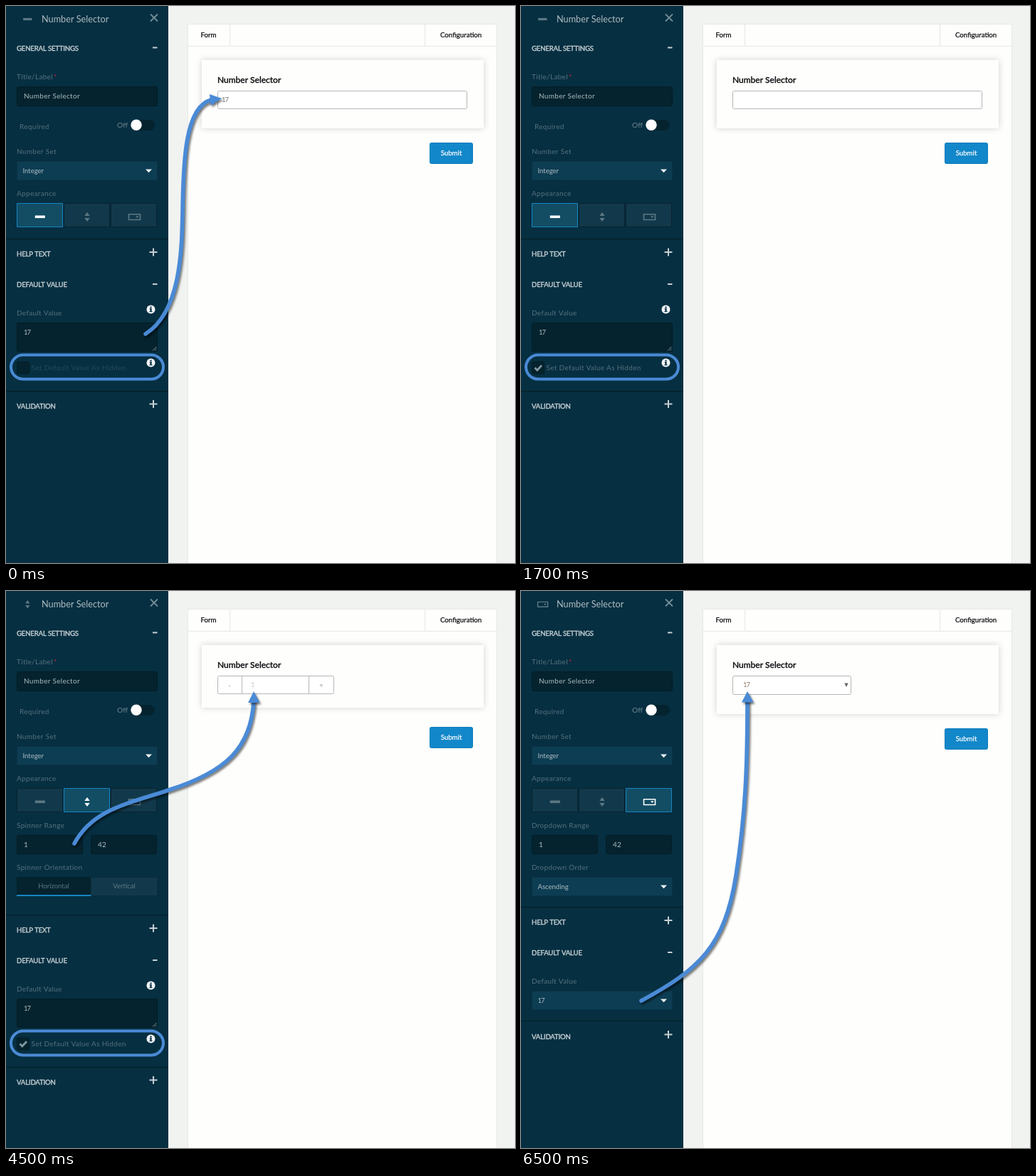
An HTML page with a canvas that plays this animation: 715x783 px, repeating every 8 s.

```html
<!DOCTYPE html>
<html lang="en">
<head>
<meta charset="utf-8">
<title>Number selector settings</title>
<style>
  html, body { margin: 0; width: 100%; height: 100%; overflow: hidden; background: #f1f3f1; }
  canvas { display: block; width: 715px; height: 783px; }
</style>
</head>
<body>
<canvas id="stage"></canvas>
<script>
const W = 715, H = 783, LOOP = 8000;
const canvas = document.getElementById('stage');
const ctx = canvas.getContext('2d');
const dpr = window.devicePixelRatio || 1;
canvas.width = W * dpr;
canvas.height = H * dpr;

const C = {
  side: '#062f41', dark: '#04232e', edge: '#031d27', select: '#0d3d53', button: '#12394b',
  active: '#124d64', accent: '#1785c4', label: '#55727f', dim: '#294b59', value: '#aebcc2',
  head: '#c5d0d4', icon: '#5c7884', page: '#f1f3f1', sheet: '#fefefc', line: '#e7e9e6',
  field: '#b6b6b6', ink: '#0c0e10', arrow: '#4a8ad6', submit: '#1287c9'
};

// size, letter spacing, outline that thickens the strokes
const T = {
  title: [12.7, 0, 0], label: [10, .32, 0], value: [10, .3, 0], digits: [9.6, -1.1, 0],
  head: [9.6, -.17, .4], tab: [9.7, 0, .25], field: [12, 0, .4], plain: [9.5, 0, 0], off: [10.3, 0, 0]
};

const scenes = [
  { end: 500, mode: 0, hidden: false, value: '17',
    arrow: [196, 461, 245, 430, 247, 345, 248, 290, 249, 215, 252, 142, 288, 132],
    tip: [303, 130, 286, 124, 287.5, 140] },
  { end: 2500, mode: 0, hidden: true, value: '' },
  { end: 4500, mode: 1, hidden: false, value: '17',
    arrow: [196, 588, 270, 544, 310, 490, 327, 400, 342, 320, 346, 240, 348, 155],
    tip: [348, 141, 340, 157, 356.5, 157] },
  { end: 6500, mode: 1, hidden: true, value: '1',
    arrow: [96, 355, 122, 306, 175, 298, 228, 280, 310, 254, 344, 220, 348, 155],
    tip: [348, 141, 340, 157, 356.5, 157] },
  { end: LOOP, mode: 2, hidden: false, value: '17',
    arrow: [169, 576, 250, 532, 286, 500, 302, 400, 316, 310, 318, 240, 318, 155],
    tip: [318, 141, 310, 156.5, 326.5, 156.5] }
];

// y is the middle of the capitals
function text(str, x, y, style, color, align = 'left') {
  const [size, gap, bold] = T[style];
  ctx.font = `400 ${size}px Lato, "Open Sans", sans-serif`;
  ctx.letterSpacing = gap + 'px';
  ctx.textAlign = align;
  ctx.fillStyle = ctx.strokeStyle = color;
  const base = Math.round(y + size * .36);
  ctx.fillText(str, x, base);
  if (bold) {
    ctx.lineWidth = bold;
    ctx.lineJoin = 'round';
    ctx.strokeText(str, x, base);
  }
}

function rect(x, y, w, h, color) {
  ctx.fillStyle = color;
  ctx.fillRect(x, y, w, h);
}

function box(x, y, w, h, r, fill, stroke) {
  ctx.beginPath();
  ctx.roundRect(x + .5, y + .5, w - 1, h - 1, r);
  ctx.fillStyle = fill;
  ctx.fill();
  ctx.lineWidth = 1;
  ctx.strokeStyle = stroke || fill;
  ctx.stroke();
}

function poly(points, color) {
  ctx.beginPath();
  for (let i = 0; i < points.length; i += 2) ctx.lineTo(points[i], points[i + 1]);
  ctx.closePath();
  ctx.fillStyle = color;
  ctx.fill();
}

function stroke(points, color, width) {
  ctx.beginPath();
  for (let i = 0; i < points.length; i += 4) {
    ctx.moveTo(points[i], points[i + 1]);
    ctx.lineTo(points[i + 2], points[i + 3]);
  }
  ctx.lineWidth = width;
  ctx.strokeStyle = color;
  ctx.stroke();
}

function modeIcon(mode, x, y, scale, color) {
  ctx.save();
  ctx.translate(x, y);
  ctx.scale(scale, scale);
  if (mode === 0) rect(-7, -2, 14, 3.6, color);
  if (mode === 1) {
    poly([0, -6.5, 3.7, -1.5, -3.7, -1.5], color);
    poly([0, 6.5, 3.7, 1.5, -3.7, 1.5], color);
  }
  if (mode === 2) {
    ctx.lineWidth = 1.6;
    ctx.strokeStyle = color;
    ctx.strokeRect(-7.7, -3.8, 16, 7.8);
    poly([1.8, -1.2, 6.4, -1.2, 4.1, 1.5], color);
  }
  ctx.restore();
}

function info(y) {
  ctx.beginPath();
  ctx.arc(203.5, y, 6, 0, Math.PI * 2);
  ctx.fillStyle = '#f4f7f8';
  ctx.fill();
  rect(202.4, y - 4, 2.2, 2, C.side);
  rect(201.6, y - 1.2, 3, 1, C.side);
  rect(202.4, y - 1.2, 2.2, 4, C.side);
  rect(201.4, y + 2.6, 4.2, 1.1, C.side);
}

function input(x, y, w, h, str, style) {
  box(x, y, w, h, 2, C.dark, C.edge);
  text(str, x + 10, y + 13.5, style, C.value);
}

function select(y, str, style = 'plain') {
  box(15, y, 198, 27, 1, C.select, '#0a3245');
  text(str, 23.5, y + 13.5, style, C.value);
  poly([196, y + 11.5, 205, y + 11.5, 200.5, y + 16.2], '#eef3f5');
}

function heading(str, y, open) {
  text(str, 15, y, 'head', C.head);
  if (open) rect(206, y - 2, 6.5, 2, C.head);
  else stroke([201.5, y - 3, 212.5, y - 3, 207, y - 8.5, 207, y + 2.5], C.head, 2);
}

function divider(y) {
  rect(0, y, 228, 1, C.edge);
}

function drawGeneral(s) {
  modeIcon(s.mode, 30.3, 18.7, .88, C.icon);
  text('Number Selector', 50, 18.5, 'title', C.value);
  stroke([203, 11.5, 213, 21.5, 213, 11.5, 203, 21.5], '#748d97', 1.8);
  heading('GENERAL SETTINGS', 59.5, true);

  text('Title/Label', 15, 99.5, 'label', C.label);
  text('*', 67, 99.5, 'label', '#d01f45');
  input(15, 113, 198, 28, 'Number Selector', 'value');

  text('Required', 19, 169.5, 'label', C.label);
  text('Off', 156, 167, 'off', '#6d858f');
  box(175, 160, 34, 15, 7, C.dark);
  ctx.beginPath();
  ctx.arc(183, 167.2, 7.7, 0, Math.PI * 2);
  ctx.fillStyle = '#fff';
  ctx.fill();

  text('Number Set', 15, 204.5, 'label', C.label);
  select(218, 'Integer');
  text('Appearance', 15, 263.5, 'label', C.label);
  for (let i = 0; i < 3; i++) {
    const on = i === s.mode, x = 15 + i * 66;
    box(x, 277, 65, 34, 0, on ? C.active : C.button, on ? C.accent : '#08222e');
    modeIcon(i, x + 32.8 + i * .2, 296.5, 1, on ? '#fff' : C.icon);
  }
}

function drawRange(mode) {
  const kind = mode === 1 ? 'Spinner' : 'Dropdown';
  text(kind + ' Range', 15, 329.5, 'label', C.label);
  input(15, 343, 93, 27, '1', 'value');
  input(119, 343, 93, 27, '42', 'value');
  text(kind + (mode === 1 ? ' Orientation' : ' Order'), 15, 388, 'label', C.label);
  if (mode === 2) return select(402, 'Ascending');
  box(15, 402, 198, 27, 1, C.button, '#0b2c3a');
  rect(15, 402, 104.5, 27, C.dark);
  rect(15, 427, 104.5, 2, C.accent);
  text('Horizontal', 67, 414.5, 'plain', C.icon, 'center');
  text('Vertical', 166, 415, 'plain', C.icon, 'center');
}

function drawHiddenOption(y, checked) {
  box(15, y - 9, 18, 18, 2, C.dark, C.edge);
  if (checked) {
    ctx.beginPath();
    ctx.moveTo(19.5, y);
    ctx.lineTo(22.8, y + 3.4);
    ctx.lineTo(29, y - 3.2);
    ctx.lineJoin = 'miter';
    ctx.lineWidth = 2.8;
    ctx.strokeStyle = '#82979f';
    ctx.stroke();
  }
  text('Set Default Value As Hidden', 35.5, y, 'label', checked ? C.label : C.dim);
  info(y - 7);
  ctx.beginPath();
  ctx.roundRect(7, y - 18, 214, 34, 17);
  ctx.lineWidth = 4;
  ctx.strokeStyle = C.arrow;
  ctx.stroke();
}

function drawSidebar(s) {
  rect(0, 0, 228, H, C.side);
  drawGeneral(s);
  if (s.mode) drawRange(s.mode);
  const dy = [0, 128, 117][s.mode];
  divider(327 + dy);
  heading('HELP TEXT', 349 + dy, false);
  heading('DEFAULT VALUE', 392 + dy, true);
  text('Default Value', 15, 431 + dy, 'label', C.label);
  if (s.mode === 2) {
    select(562, '17', 'digits');
    divider(604);
    heading('VALIDATION', 626.5, false);
    return;
  }
  const top = 445 + dy;
  info(426.5 + dy);
  input(15, top, 198, 41, '17', 'digits');
  stroke([206, top + 39.5, 211.5, top + 34, 209, top + 39.5, 211.5, top + 37], '#8b9a9f', .9);
  drawHiddenOption(508.5 + dy, s.hidden);
  divider(541 + dy);
  heading('VALIDATION', 562.5 + dy, false);
}

function drawField(s) {
  if (s.mode === 0) {
    box(297, 119, 351, 26, 2, '#fff', C.field);
    text(s.value, 303, 131.5, 'digits', '#777');
  } else if (s.mode === 1) {
    box(297, 119, 164, 26, 2, '#fff', C.field);
    rect(331, 119, 1, 26, C.field);
    rect(425, 119, 1, 26, C.field);
    text('-', 314, 132, 'value', '#a5a5a5', 'center');
    text('+', 443, 132, 'value', '#a5a5a5', 'center');
    text(s.value, 344, 131.5, 'digits', '#c9c9c9');
  } else {
    box(297, 119, 167, 27, 2, '#fff', C.field);
    text(s.value, 312, 132, 'digits', '#8d7a66');
    poly([454.3, 129.5, 459.7, 129.5, 457, 135], '#666');
  }
}

function drawForm(s) {
  rect(228, 0, W - 228, H, C.page);
  rect(255, 25, 435, H - 25, C.line);
  rect(256, 26, 433, H - 26, C.sheet);
  rect(255, 56, 435, 1, C.line);
  rect(314, 26, 1, 30, C.line);
  rect(588, 26, 1, 30, C.line);
  text('Form', 273.5, 41, 'tab', C.ink);
  text('Configuration', 610, 40.5, 'tab', C.ink);

  ctx.save();
  ctx.shadowColor = 'rgba(0,0,0,.18)';
  ctx.shadowBlur = 9 * dpr;
  rect(275, 76, 396, [96, 88, 97][s.mode], C.sheet);
  ctx.restore();
  text('Number Selector', 297, 103.5, 'field', C.ink);
  drawField(s);

  const y = [192, 191, 193][s.mode];
  box(595, y, 61, 30, 2, C.submit, '#0d7cbb');
  text('Submit', 625.5, y + 15, 'tab', '#fff', 'center');
}

function drawArrow({ arrow: p, tip }) {
  ctx.save();
  ctx.shadowColor = 'rgba(0,0,0,.5)';
  ctx.shadowBlur = 3 * dpr;
  ctx.shadowOffsetX = 2 * dpr;
  ctx.shadowOffsetY = 2.5 * dpr;
  ctx.lineCap = 'round';
  ctx.lineWidth = 5.6;
  ctx.strokeStyle = C.arrow;
  ctx.beginPath();
  ctx.moveTo(p[0], p[1]);
  ctx.bezierCurveTo(...p.slice(2, 8));
  ctx.bezierCurveTo(...p.slice(8));
  ctx.stroke();
  poly(tip, C.arrow);
  ctx.restore();
}

function draw(t) {
  const s = scenes.find(scene => t < scene.end);
  ctx.setTransform(dpr, 0, 0, dpr, 0, 0);
  drawForm(s);
  drawSidebar(s);
  if (s.arrow) drawArrow(s);
}

let start;
function tick(now) {
  start ??= now;
  draw((now - start) % LOOP);
  requestAnimationFrame(tick);
}
requestAnimationFrame(tick);
</script>
</body>
</html>
```
